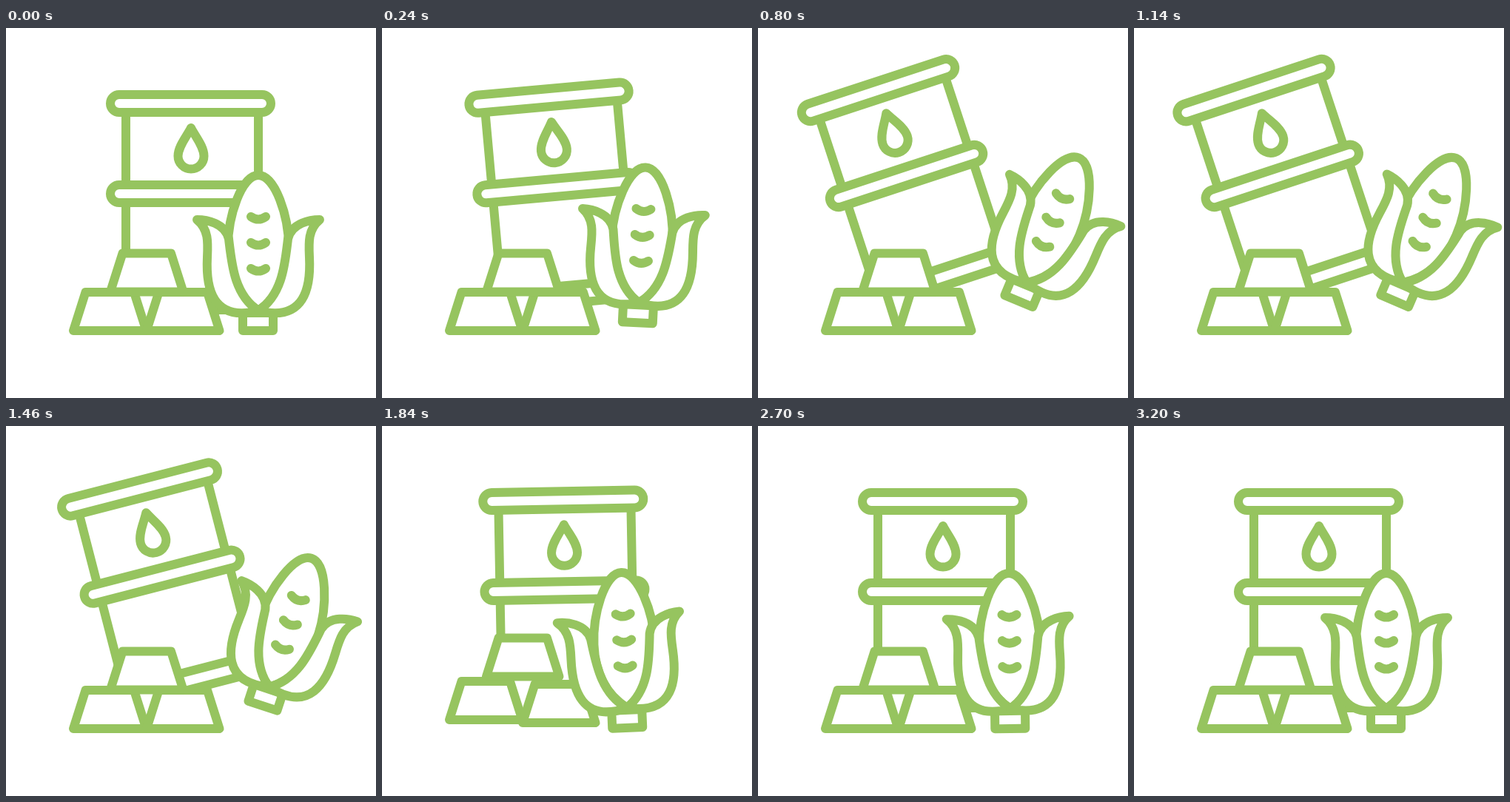
Write an HTML page that moves like this. It is 500 px wide and 500 px high and loops after 3.22 s.

```html
<!DOCTYPE html>
<html lang="en">
<head>
<meta charset="utf-8">
<title>Commodities</title>
<style>
  html, body { margin: 0; width: 100%; height: 100%; overflow: hidden; background: #fff; }
  svg {
    display: block; width: 100%; height: 100%;
    fill: #fff; stroke: #96c45f; stroke-width: 12;
    stroke-linecap: round; stroke-linejoin: round;
  }
  .barrel, .corn, .leaves, .bar { animation: 3220ms linear infinite; }

  .barrel { transform-origin: 150px 365px; animation-name: tip; }
  @keyframes tip {
    0% { rotate: 0deg; animation-timing-function: cubic-bezier(.4, 0, .2, 1); }
    27.95% { rotate: -18.3deg; }
    34.16% { rotate: -18.3deg; animation-timing-function: cubic-bezier(.66, 0, .25, 1); }
    65.2%, 100% { rotate: 0deg; }
  }

  /* the corn is pushed along with the barrel and leans a little later */
  .corn { transform-origin: 341px 384px; animation-name: hop, lean; }
  @keyframes hop {
    0% { translate: 0 0; animation-timing-function: cubic-bezier(.4, 0, .2, 1); }
    27.95% { translate: 21.5px -38px; }
    34.16% { translate: 21.5px -38px; animation-timing-function: cubic-bezier(.7, 0, .6, 1); }
    58.4% { translate: -10px -1px; animation-timing-function: ease-in-out; }
    71.4%, 100% { translate: 0 0; }
  }
  @keyframes lean {
    0%, 1.86% { rotate: 0deg; animation-timing-function: cubic-bezier(.4, 0, .2, 1); }
    31.06% { rotate: 23.3deg; }
    34.16% { rotate: 23.3deg; animation-timing-function: cubic-bezier(.76, 0, .6, 1); }
    58.4% { rotate: -2.6deg; animation-timing-function: ease-in-out; }
    71.4% { rotate: -3deg; animation-timing-function: ease-in-out; }
    90%, 100% { rotate: 0deg; }
  }

  /* the leaves swing further than the cob */
  .leaves { transform-origin: 341px 384px; animation-name: sway; }
  @keyframes sway {
    0%, 1.86% { rotate: 0deg; animation-timing-function: cubic-bezier(.4, 0, .2, 1); }
    31.06% { rotate: 2.4deg; }
    34.16% { rotate: 2.4deg; animation-timing-function: cubic-bezier(.76, 0, .6, 1); }
    58.4% { rotate: -3deg; animation-timing-function: ease-in-out; }
    71.4% { rotate: -3.7deg; animation-timing-function: ease-in-out; }
    90%, 100% { rotate: 0deg; }
  }

  .bar { animation-name: lift; }
  @keyframes lift {
    0%, 50.31% { translate: 0 0; animation-timing-function: ease-out; }
    57.45% { translate: 0 var(--up); animation-timing-function: ease-in-out; }
    81.99%, 100% { translate: 0 0; }
  }
</style>
</head>
<body>
<svg viewBox="0 0 500 500">
  <defs>
    <rect id="hoop" x="141" width="217" height="24" rx="12"/>
    <path id="ingot" d="M0 0L16.5-52H82L98.5 0Z"/>
    <path id="leaf" d="M258 259C270 259 296 263 301 285C305 318 308 360 341 382C278 398 270 350 272 310C273 290 274 272 258 259Z"/>
    <path id="kernel" d="M331 0Q341 7 351 0" fill="none"/>
  </defs>

  <g class="barrel">
    <path d="M162 102H341V369H162Z"/>
    <use href="#hoop" y="90"/>
    <use href="#hoop" y="212"/>
    <use href="#hoop" y="357"/>
    <path d="M250 135C244 147 232.5 160 232.5 173A17.5 17.5 0 0 0 267.5 173C267.5 160 256 147 250 135Z"/>
  </g>

  <path d="M160 345H220L190 405Z" stroke="none"/>
  <g class="bar" style="--up:-12px"><use href="#ingot" x="91" y="409"/></g>
  <g class="bar" style="--up:-8px"><use href="#ingot" x="190" y="409"/></g>
  <g class="bar" style="--up:-18px"><use href="#ingot" x="141" y="356.5"/></g>

  <g class="corn">
    <path d="M320 385H361V409H320Z"/>
    <path d="M341 199C318 199 300 255 300 295C300 340 318 366 341 382C364 366 382 340 382 295C382 255 364 199 341 199Z"/>
    <use href="#kernel" y="255"/>
    <use href="#kernel" y="290"/>
    <use href="#kernel" y="325"/>
    <g class="leaves">
      <use href="#leaf"/>
      <use href="#leaf" transform="matrix(-1 0 0 1 682 0)"/>
    </g>
  </g>
</svg>
</body>
</html>
```
